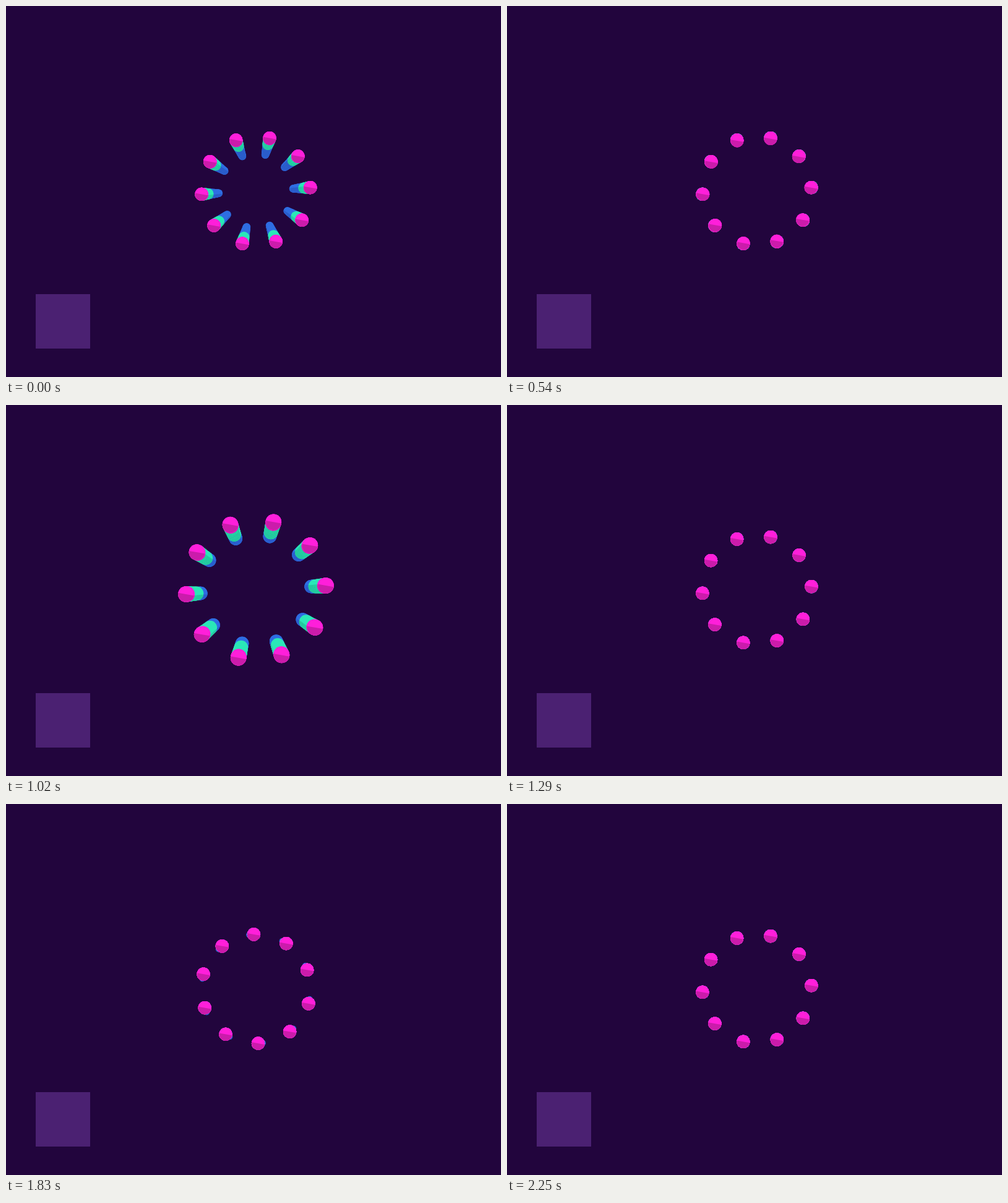
These frames come from a looping animation (800x600 px, 2.58 s). An HTML page with a canvas:

```html
<!DOCTYPE html>
<html lang="en">
<head>
<meta charset="utf-8">
<title>Dot ring loader</title>
<style>
  html, body { margin: 0; width: 100%; height: 100%; overflow: hidden; background: #22053d; }
  canvas { display: block; }
  .badge { position: absolute; left: 47.5px; top: 465.5px; width: 88px; height: 88px; background: #4b2172; }
</style>
</head>
<body>
<canvas id="stage" width="800" height="600"></canvas>
<div class="badge"></div>
<script>
const ctx = document.getElementById('stage').getContext('2d');
const LOOP = 2580, STEP = 30, LAST = 75;
const CX = 404, CY = 299, RING = 88.2, DOT = 10.6;
const DOTS = 10, START = -3.5, TURN = 19.2;
const COPIES = 36, DELAY = 6.8;
const TILT = 10 * Math.PI / 180;

// [light half, dark half]
const BLUE = ['#2f6ee2', '#2a5bc8'];
const GREEN = ['#2be8b8', '#23c69c'];
const PINK = ['#ff1fda', '#cb1cab'];

// cubic-bezier(.7, 0, .3, 1), solved by bisection
function ease(x) {
  if (x <= 0) return 0;
  if (x >= 1) return 1;
  let lo = 0, hi = 1, u = 0.5;
  for (let i = 0; i < 24; i++) {
    u = (lo + hi) / 2;
    const v = 1 - u;
    if (2.1 * v * v * u + 0.9 * v * u * u + u * u * u < x) lo = u; else hi = u;
  }
  return u * u * (3 - 2 * u);
}

// Rises to 1 at the peak and falls back, each over `half` steps
const bump = (t, peak, half) => ease(1 - Math.abs(t - peak) / half);

function pose(t) {
  const inward = bump(t, 3.3, 9.8);
  const outward = bump(t, 26.8, 9);
  const there = ease((t - 40.1) / 9.5);
  const back = ease((t - 57.1) / 9.5);
  const turn = there - back;
  const pinch = 4 * turn * (1 - turn);
  return {
    ring: RING - 32.5 * inward + 25.2 * outward,
    angle: START + TURN * turn,
    r: DOT * (1 - 0.48 * inward + 0.2 * outward) * (1 - 0.72 * pinch)
  };
}

function ball(x, y, r, [light, dark]) {
  ctx.fillStyle = light;
  ctx.beginPath();
  ctx.arc(x, y, r, 0, 2 * Math.PI);
  ctx.fill();
  ctx.fillStyle = dark;
  ctx.beginPath();
  ctx.arc(x, y, r, TILT, TILT + Math.PI);
  ctx.fill();
}

function draw(step) {
  ctx.fillStyle = '#22053d';
  ctx.fillRect(0, 0, 800, 600);
  // Blue leads at the back, pink follows on top
  for (let c = 0; c < COPIES; c++) {
    const lag = c / (COPIES - 1);
    const color = lag < 0.3 ? BLUE : lag < 0.69 ? GREEN : PINK;
    const p = pose(step - lag * DELAY);
    for (let i = 0; i < DOTS; i++) {
      const a = (p.angle + i * 360 / DOTS) * Math.PI / 180;
      ball(CX + p.ring * Math.cos(a), CY + p.ring * Math.sin(a), p.r, color);
    }
  }
}

const origin = performance.now();
function tick() {
  const t = (performance.now() - origin) % LOOP;
  draw(Math.min(LAST, Math.floor(t / STEP)));
  requestAnimationFrame(tick);
}
tick();
</script>
</body>
</html>
```
